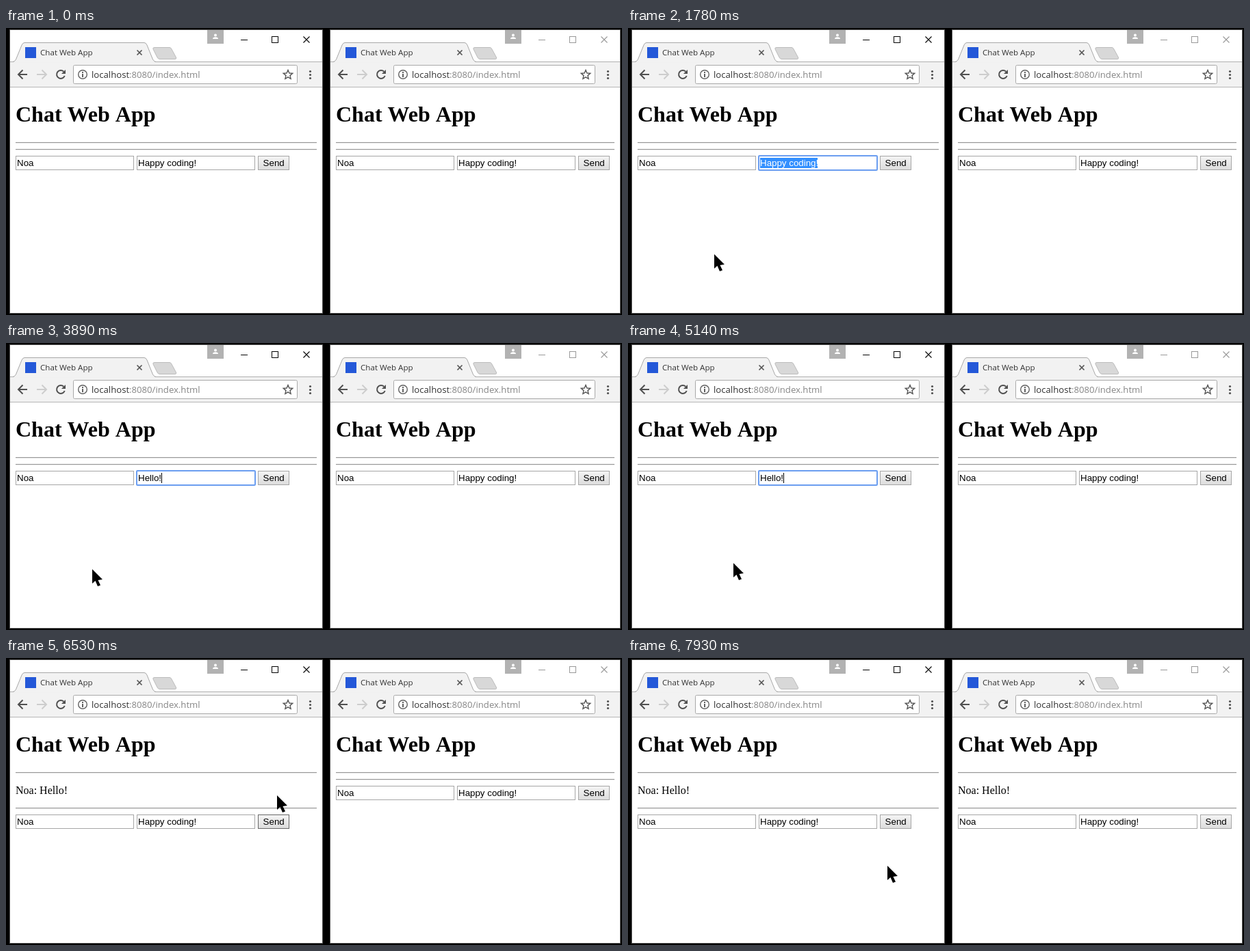
Write an HTML page with a canvas that moves like this. It is 900 px wide and 420 px high and loops after 8 s.

```html
<!DOCTYPE html>
<html lang="en">
<head>
<meta charset="utf-8">
<title>Chat Web App</title>
<style>
  html, body { margin: 0; width: 100%; height: 100%; overflow: hidden; background: #000; }
  canvas { display: block; }
</style>
</head>
<body>
<canvas id="stage" width="900" height="420"></canvas>
<script>
const ctx = document.getElementById('stage').getContext('2d');
const LOOP = 8000;
const SANS = '13.333px "Liberation Sans", Arial, sans-serif';
const SERIF = '"Liberation Serif", "Times New Roman", serif';
const UI = '"Open Sans", "Noto Sans", sans-serif';
const USER = 'Noa', GREETING = 'Happy coding!', REPLY = 'Hello!';

// Pointer moves: start, end, number of steps, points along the way.
const MOVES = [
  [80, 460, 6, [[289, 402], [288, 300], [287, 240], [287, 217]]],
  [690, 920, 4, [[287, 212], [287, 206], [286, 200], [286, 197]]],
  [1180, 1780, 9, [[286, 197], [258, 193], [222, 192], [188, 197], [156, 220],
                   [130, 258], [118, 294], [119, 320], [126, 331]]],
  [5060, 5830, 11, [[130, 330], [170, 316], [240, 290], [320, 261], [378, 242], [396, 237], [396, 229]]],
  [5900, 5980, 2, [[396, 212], [396, 201]]],
  [6610, 7150, 8, [[395, 208], [390, 240], [383, 275], [379, 296]]],
  [7230, 7230, 1, [[379, 299]]],
  [7930, 7930, 1, [[379, 304]]]
];
const TYPING = [[0, GREETING], [2240, ''], [2950, 'H'], [3110, 'He'], [3250, 'Hel'],
                [3400, 'Hell'], [3570, 'Hello'], [3890, REPLY], [6380, GREETING]];
const CARET = [[2240, 2790], [2950, 4420], [4900, 5430], [5900, 6210]];
const SUGGESTIONS = ['Hello!', 'Hello World!', 'Happy coding!', 'Hi!', 'How are you?', 'Have fun!'];

const during = (t, a, b) => t >= a && t < b;
const latest = (list, t) => list.filter(item => t >= item[0]).pop();

function pointerAt(t) {
  const move = latest(MOVES, t);
  if (!move) return null;
  const [start, end, steps, path] = move;
  const step = steps > 1 ? Math.min(steps - 1, Math.floor((t - start) / (end - start) * (steps - 1) + 0.1)) : 0;
  const place = steps > 1 ? step / (steps - 1) * (path.length - 1) : 0;
  const i = Math.min(Math.floor(place), path.length - 1);
  const [a, b] = [path[i], path[Math.min(i + 1, path.length - 1)]];
  return a.map((v, k) => Math.round(v + (b[k] - v) * (place - i)));
}

function rect(x, y, w, h, color) {
  ctx.fillStyle = color;
  ctx.fillRect(x, y, w, h);
}

function frame(x, y, w, h, color) {
  ctx.strokeStyle = color;
  ctx.lineWidth = 1;
  ctx.strokeRect(x + 0.5, y + 0.5, w - 1, h - 1);
}

function text(str, x, y, font, color = '#000') {
  ctx.font = font;
  ctx.fillStyle = color;
  ctx.fillText(str, x, y);
}

function draw(path, { fill, stroke, width = 1 }) {
  const shape = new Path2D(path);
  if (fill) { ctx.fillStyle = fill; ctx.fill(shape); }
  if (stroke) { ctx.strokeStyle = stroke; ctx.lineWidth = width; ctx.stroke(shape); }
}

function disc(x, y, r, color) {
  ctx.fillStyle = color;
  ctx.beginPath();
  ctx.arc(x, y, r, 0, 7);
  ctx.fill();
}

function textWidth(str) {
  ctx.font = SANS;
  return ctx.measureText(str).width;
}

// "left" shifts left-aligned parts, "right" shifts right-aligned ones.
function browser(left, right, active) {
  const edge = 462 + right;
  rect(left + 5, 2, edge - left - 4, 416, '#555');
  rect(left + 6, 3, edge - left - 6, 414, '#fff');
  rect(left + 6, 49, edge - left - 6, 37, '#f2f2f2');
  rect(left + 6, 49, edge - left - 6, 1, '#b0b0b0');
  rect(left + 6, 86, edge - left - 6, 1, '#b6b6b6');

  ctx.save();
  ctx.translate(left, 0);
  draw('M10 50.5 Q13 49 14.5 46 L23 25 Q24.5 21.5 27 21.5 H202 Q204.500 21.5 206 25 L214.500 46 Q216 49 219 50.5 Z', { fill: '#f2f2f2' });
  draw('M10 49.5 Q13 49 14.5 46 L23 25 Q24.5 21.5 27 21.5 H202 Q204.5 21.5 206 25 L214.5 46 Q216 49 219 49.5', { stroke: '#a8a8a8' });
  draw('M217 28.5 H239 Q241 28.5 242 31 L248.5 43 Q249.500 45.5 247 45.5 H225 Q222 45.5 221 43 L215 31 Q214 28.5 217 28.5 Z', { fill: '#d8d8d8', stroke: '#bcbcbc' });
  rect(28, 28, 16, 16, '#2458d8');
  text('Chat Web App', 50, 40, '11.6px ' + UI, '#333');
  draw('M191.500 32.500 l7 7 m0 -7 l-7 7', { stroke: '#555', width: 1.7 });
  draw('M31 68 H18.500 M24.500 61.500 L18 68 L24.500 74.500', { stroke: '#505050', width: 2 });
  draw('M45 68 H58.500 M52.500 61.500 L59 68 L52.500 74.500', { stroke: '#cdcdcd', width: 2 });
  draw('M84.300 63.700 A6 6 0 1 0 85.700 70', { stroke: '#505050', width: 2 });
  draw('M87 61 V67 H81 Z', { fill: '#505050' });
  ctx.restore();

  ctx.beginPath();
  ctx.roundRect(left + 98.5, 54.5, 327 + right - left, 27, 2);
  ctx.fillStyle = '#fff';
  ctx.fill();
  ctx.strokeStyle = '#a9a9a9';
  ctx.lineWidth = 1;
  ctx.stroke();

  ctx.save();
  ctx.translate(left, 0);
  draw('M118.300 68 a6.300 6.300 0 1 0 -12.600 0 a6.300 6.300 0 1 0 12.600 0', { stroke: '#606060', width: 1.4 });
  rect(111, 64, 2, 2, '#606060');
  rect(111, 67, 2, 5, '#606060');
  const urlFont = '13.15px ' + UI;
  text('localhost', 125, 73, urlFont, '#333');
  text(':8080/index.html', 125 + ctx.measureText('localhost').width, 73, urlFont, '#858585');
  ctx.restore();

  ctx.save();
  ctx.translate(right, 0);
  draw('M412 61.500 L413.900 66 L418.700 66.400 L415 69.600 L416.100 74.300 L412 71.800 L407.900 74.300 L409 69.600 L405.300 66.400 L410.100 66 Z', { stroke: '#555', width: 1.4 });
  [63, 68, 73].forEach(y => disc(444.5, y + 0.5, 1.6, '#505050'));
  rect(294, 3, 24, 20, '#b2b2b2');
  disc(306, 10.5, 2, '#fff');
  draw('M302 16 Q302 13.300 306 13.300 Q310 13.300 310 16 Z', { fill: '#fff' });
  const ink = active ? '#000' : '#999';
  rect(343, 17, 10, 1, ink);
  frame(388, 12, 10, 10, ink);
  draw('M434.500 12.500 l9 9 m0 -9 l-9 9', { stroke: ink, width: 1.1 });
  ctx.restore();
}

function rule(y, x, end) {
  rect(x, y, end - x, 1, '#999');
  rect(x, y + 1, end - x, 1, '#e6e6e6');
}

function field(x, y) {
  rect(x, y, 173, 21, '#fff');
  frame(x, y, 173, 21, '#a6a6a6');
}

function button(x, y, state) {
  const shade = ctx.createLinearGradient(0, y, 0, y + 21);
  const [top, bottom] = state === 'pressed' ? ['#d8d8d8', '#ececec'] : ['#f5f5f5', '#dcdcdc'];
  shade.addColorStop(0, top);
  shade.addColorStop(1, bottom);
  rect(x, y, 46, 21, shade);
  frame(x, y, 46, 21, state ? '#686868' : '#a6a6a6');
  text('Send', x + 7.6, y + 15, SANS);
}

function page(left, right, sent, value, buttonState) {
  const x = left + 14, end = 454 + right, y = sent ? 229 : 187;
  text('Chat Web App', x, 137, 'bold 32px ' + SERIF);
  rule(167, x, end);
  rule(y - 10, x, end);
  if (sent) text(`${USER}: ${REPLY}`, x, 199, '16px ' + SERIF);
  field(x, y);
  field(x + 177, y);
  text(USER, x + 2, y + 15, SANS);
  text(value, x + 179, y + 15, SANS);
  button(x + 354, y, buttonState);
}

function selection(x) {
  let first = 0;
  const edge = i => 193 + textWidth(GREETING.slice(0, i));
  for (let i = 1; i <= GREETING.length; i++) {
    if (Math.abs(edge(i) - x) < Math.abs(edge(first) - x)) first = i;
  }
  const from = edge(first);
  if (first === GREETING.length) return;
  rect(Math.round(from), 190, 277 - Math.round(from), 15, '#3390ff');
  text(GREETING.slice(first), from, 202, SANS, '#fff');
}

function suggestions(count) {
  const height = count * 24 + 2;
  rect(191, 208, 173, height, '#fff');
  frame(191, 208, 173, height, '#c7cace');
  SUGGESTIONS.slice(0, count).forEach((s, i) => text(s, 199, 225 + i * 24, SANS));
}

function pointer([x, y], beam) {
  ctx.save();
  ctx.translate(x, y);
  if (beam) draw('M-4 -9.500 H-1 L0.500 -8 L2 -9.500 H5 M0.500 -9 V10 M-4 10.500 H-1 L0.500 9 L2 10.500 H5', { stroke: '#000' });
  else draw('M0 0 V21 L4.500 17 L8 25 L12 23.500 L8.500 16 L15 15 Z', { fill: '#000' });
  ctx.restore();
}

function render(now) {
  const t = now % LOOP;
  const at = pointerAt(t);
  const value = latest(TYPING, t)[1];
  const sent = t >= 6380;
  let state = '';
  if (during(t, 6210, 6380)) state = 'pressed';
  else if (t >= 5970 && at[1] < 250) state = 'hover';

  rect(0, 0, 900, 420, '#000');
  browser(0, 0, true);
  page(0, 0, sent, value, state);
  browser(468, 435, false);
  page(468, 435, t >= 7400, GREETING, '');

  if (during(t, 1180, 6210)) {
    ctx.strokeStyle = '#6a9df0';
    ctx.lineWidth = 2;
    ctx.beginPath();
    ctx.roundRect(191, 187, 173, 21, 1);
    ctx.stroke();
  }
  if (during(t, 1180, 2240)) selection(at[0]);
  if (CARET.some(([a, b]) => during(t, a, b))) rect(Math.floor(193 + textWidth(value)), 190, 1, 15, '#000');
  if (during(t, 2950, 3890)) suggestions(t < 3110 ? 6 : 2);
  if (at) pointer(at, during(t, 760, 1772));
  requestAnimationFrame(render);
}
requestAnimationFrame(render);
</script>
</body>
</html>
```
